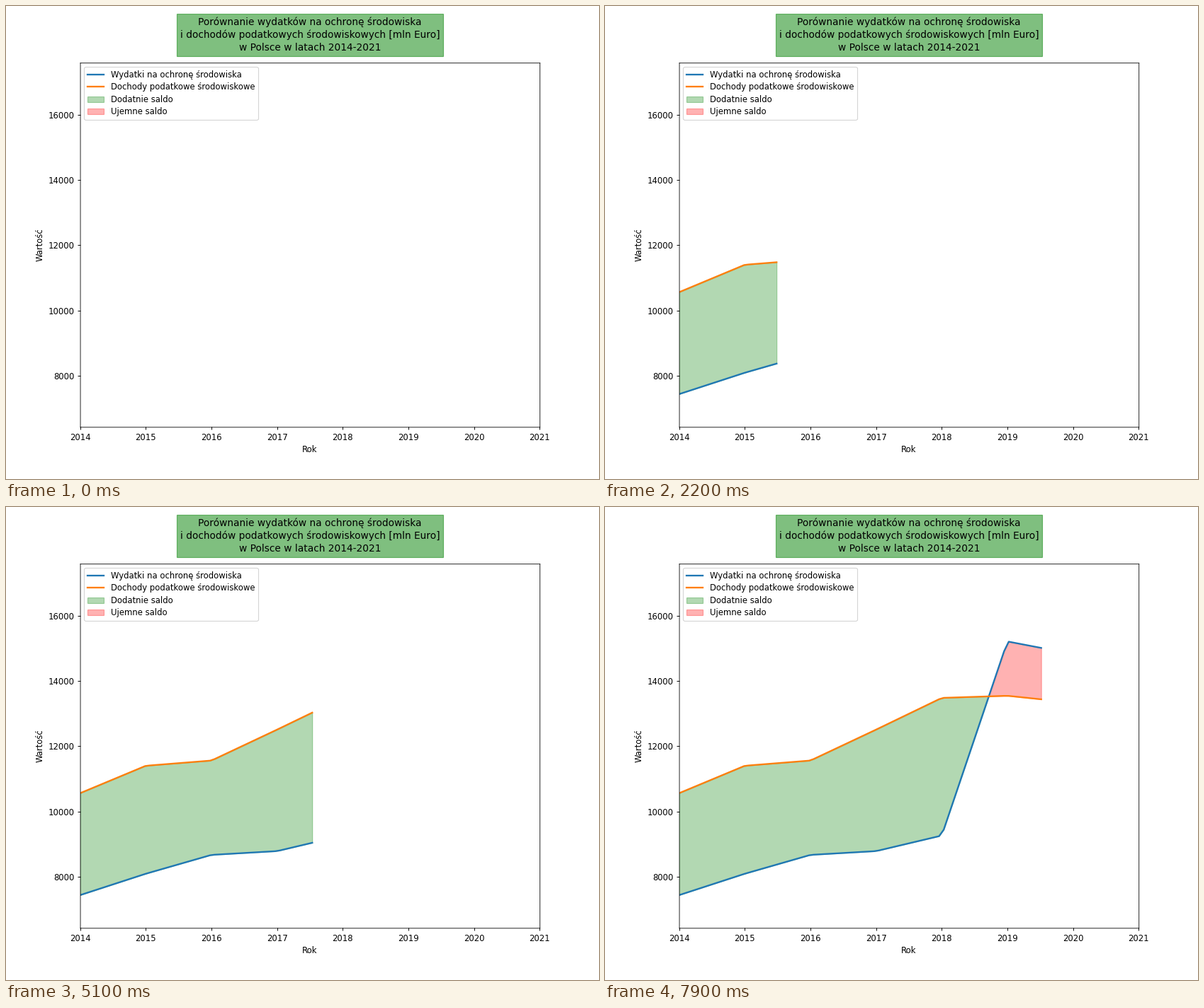
A matplotlib script that plays this animation: 837 by 669 pixels, repeating every 8000 ms.

```python
import numpy as np
import matplotlib.pyplot as plt
from matplotlib.animation import FuncAnimation
from matplotlib.patches import Patch
from matplotlib.patheffects import Stroke

plt.rcParams["font.family"] = "DejaVu Sans"

STEPS = 100
FRAMES = 80
INTERVAL = 100

years = np.arange(2014, 2022)
spending_by_year = [7438, 8093, 8671, 8787, 9264, 15216, 14831, 16598]
taxes_by_year = [10564, 11404, 11564, 12513, 13485, 13550, 13340, 16200]

x = np.linspace(2014, 2021, STEPS)
spending = np.interp(x, years, spending_by_year)
taxes = np.interp(x, years, taxes_by_year)

# 837 x 669 pixels
fig, ax = plt.subplots(figsize=(10.009, 8), dpi=83.625)
ax.set_xlim(2014, 2021)
ax.set_ylim(6430, 17598)
ax.set_xlabel("Rok")
ax.set_ylabel("Wartość")
ax.set_title(
    "Porównanie wydatków na ochronę środowiska\n"
    "i dochodów podatkowych środowiskowych [mln Euro]\n"
    "w Polsce w latach 2014-2021",
    pad=15, fontsize=11.88, linespacing=1.31,
    bbox=dict(facecolor="green", edgecolor="green", alpha=0.5),
)

# soft frame lines, just right of and below the axes edges
for spine in ax.spines.values():
    spine.set(snap=False, linewidth=0.72,
              path_effects=[Stroke(offset=(0.36, -0.36))])

spending_line, = ax.plot([], [], lw=2, color="tab:blue",
                         label="Wydatki na ochronę środowiska")
taxes_line, = ax.plot([], [], lw=2, color="tab:orange",
                      label="Dochody podatkowe środowiskowe")
ax.legend(
    handles=[
        spending_line,
        taxes_line,
        Patch(color="green", alpha=0.3, label="Dodatnie saldo"),
        Patch(color="red", alpha=0.3, label="Ujemne saldo"),
    ],
    loc="upper left", labelspacing=0.39,
)

fills = []


def shade(n, where, color):
    fills.append(ax.fill_between(x[:n], spending[:n], taxes[:n],
                                 where=where[:n], interpolate=True,
                                 color=color, alpha=0.3))


def update(frame):
    n = frame if frame > 1 else 0
    while fills:
        fills.pop().remove()
    spending_line.set_data(x[:n], spending[:n])
    taxes_line.set_data(x[:n], taxes[:n])
    if n:
        surplus = taxes >= spending
        shade(n, surplus, "green")
        if not surplus[:n].all():
            shade(n, ~surplus, "red")
    return [spending_line, taxes_line, *fills]


anim = FuncAnimation(fig, update, frames=FRAMES, interval=INTERVAL,
                     init_func=lambda: update(0), repeat=True, blit=False)
plt.show()
```
